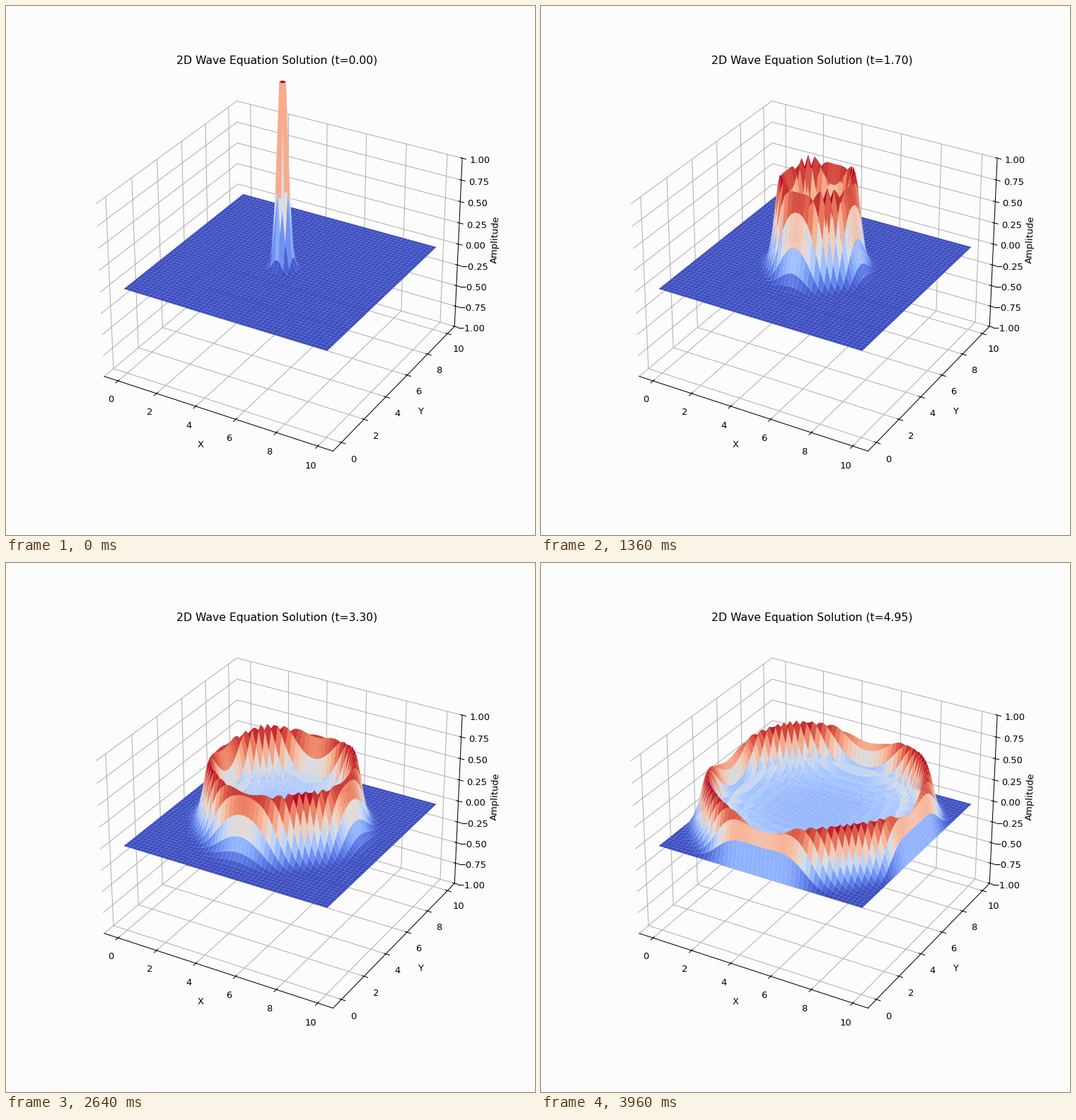
Recreate the animation shown at these times as a matplotlib script. Size 748 by 748 pixels, loop 4000 ms.

```python
import numpy as np
import matplotlib.pyplot as plt
from matplotlib.animation import FuncAnimation

SIZE, DPI = 748, 93.5
FRAMES, INTERVAL = 100, 40
N, LENGTH, SIGMA = 50, 10.0, 0.2
SPEED, DT = 1.0, 0.05

x = np.linspace(0, LENGTH, N)
X, Y = np.meshgrid(x, x)
RATIO = (SPEED * DT / (x[1] - x[0])) ** 2


def step(u, prev):
    """One leapfrog step with the border held at zero."""
    new = np.zeros_like(u)
    mid = u[1:-1, 1:-1]
    lap = u[2:, 1:-1] + u[:-2, 1:-1] + u[1:-1, 2:] + u[1:-1, :-2] - 4 * mid
    new[1:-1, 1:-1] = 2 * mid - prev[1:-1, 1:-1] + RATIO * lap
    return new


def solve():
    prev = np.zeros((N, N))
    u = np.exp(-((X - LENGTH / 2) ** 2 + (Y - LENGTH / 2) ** 2) / (2 * SIGMA ** 2))
    u, prev = step(u, prev), u
    states = []
    for _ in range(FRAMES):
        u, prev = step(u, prev), u
        states.append(u)
    return states


def corners(a):
    """The four corner values of every grid cell."""
    cells = [a[:-1, :-1], a[:-1, 1:], a[1:, 1:], a[1:, :-1]]
    return np.stack(cells, axis=-1).reshape(-1, 4)


waves = solve()
cell_x, cell_y = corners(X), corners(Y)

fig = plt.figure(figsize=(SIZE / DPI, SIZE / DPI), dpi=DPI, facecolor="#fcfcfc")
ax = fig.add_subplot(111, projection="3d", facecolor="#fcfcfc")
surface = ax.plot_surface(X, Y, waves[0], cmap="coolwarm")
ax.set_zlim(-1, 1)
ax.set_xlabel("X")
ax.set_ylabel("Y")
ax.set_zlabel("Amplitude")
for axis in (ax.xaxis, ax.yaxis, ax.zaxis):
    axis.set_pane_color((1, 1, 1, 0))
title = ax.set_title("")


def update(i):
    cell_z = corners(waves[i])
    height = cell_z.mean(axis=1)
    surface.set_verts(np.stack([cell_x, cell_y, cell_z], axis=-1))
    surface.set_array(height)
    surface.set_clim(height.min(), height.max())
    title.set_text(f"2D Wave Equation Solution (t={i * DT:.2f})")
    return surface, title


anim = FuncAnimation(fig, update, frames=FRAMES, interval=INTERVAL,
                     repeat=True, repeat_delay=0, blit=False)
plt.show()
```
